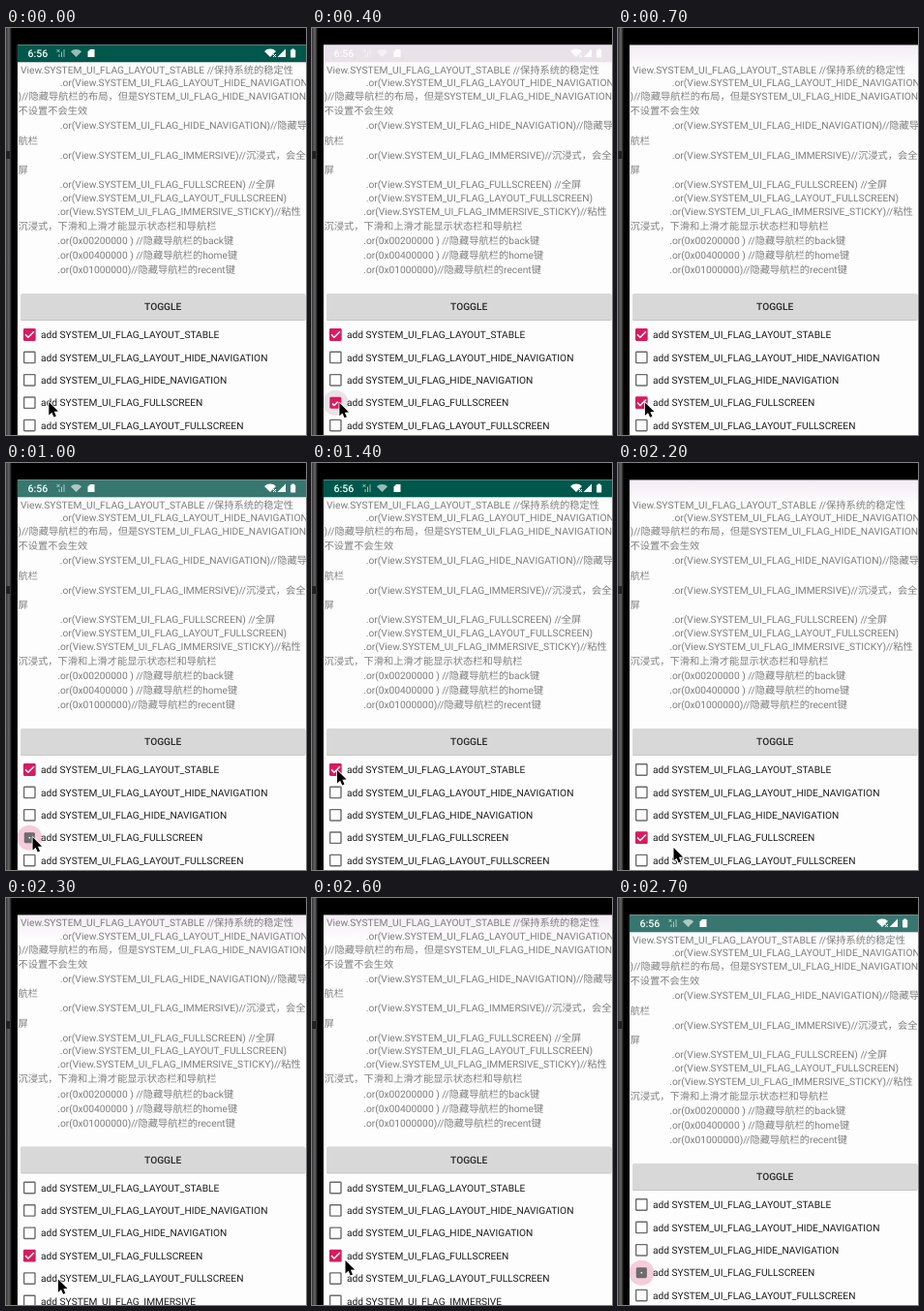
Animation, 310 px wide and 420 px high, one loop 2800 ms. Source, as an HTML page with a canvas:

```html
<!DOCTYPE html>
<html lang="zh-CN">
<head>
<meta charset="utf-8">
<title>System UI flags</title>
<style>
  html, body { margin: 0; width: 100%; height: 100%; overflow: hidden; background: #000; }
  canvas { display: block; width: 310px; height: 420px; }
</style>
</head>
<body>
<canvas id="stage"></canvas>
<script>
const W = 310, H = 420, LOOP = 2800, STEP = 100;
const LEFT = 12, TOP = 17.3, BAR_H = 18, BOX_X = 24.3;
const PAPER = '#fdfdfd', PINK = '#d81b60', GREY = '#6c6c6c';
const FAMILY = 'Roboto, "Noto Sans CJK SC", "Noto Sans CJK", sans-serif';

const canvas = document.getElementById('stage');
const ctx = canvas.getContext('2d');
const dpr = window.devicePixelRatio || 1;
canvas.width = W * dpr;
canvas.height = H * dpr;

const FLAG = 'SYSTEM_UI_FLAG_';
const indent = (str, n = 17) => ' '.repeat(n) + str;
const or = (name, n) => indent(`.or(View.${FLAG}${name}`, n);

const LINES = [
  ` View.${FLAG}LAYOUT_STABLE //保持系统的稳定性`,
  or('LAYOUT_HIDE_NAVIGATION'),
  `)//隐藏导航栏的布局，但是${FLAG}HIDE_NAVIGATION`,
  '不设置不会生效',
  or('HIDE_NAVIGATION)//隐藏导'),
  '航栏',
  or('IMMERSIVE)//沉浸式，会全'),
  '屏',
  or('FULLSCREEN) //全屏'),
  or('LAYOUT_FULLSCREEN)'),
  or('IMMERSIVE_STICKY)//粘性', 16),
  '沉浸式，下滑和上滑才能显示状态栏和导航栏',
  indent('.or(0x00200000 ) //隐藏导航栏的back键', 16),
  indent('.or(0x00400000 ) //隐藏导航栏的home键', 16),
  indent('.or(0x01000000)//隐藏导航栏的recent键', 16)
];
const OPTIONS = ['LAYOUT_STABLE', 'LAYOUT_HIDE_NAVIGATION', 'HIDE_NAVIGATION',
  'FULLSCREEN', 'LAYOUT_FULLSCREEN', 'IMMERSIVE'];
const STABLE = 0, FULL = 3;
const START = { [STABLE]: true };
const TAPS = { [STABLE]: [1500], [FULL]: [300, 1000, 1900, 2700] };

// Places the pointer passes: [time, x, y]
const STOPS = [[0, 44.3, 386], [200, 28.5, 387], [1100, 27.5, 386], [1400, 26, 317],
  [1500, 26, 317], [1800, 28.3, 388], [2100, 28.5, 388], [2200, 57.5, 397], [2600, 34.5, 374]];

const rowY = i => 316.5 + i * 23.4;
const clamp = v => Math.max(0, Math.min(1, v));
const mix = (a, b, k) => a + (b - a) * k;

// Whether an option is on, and how many steps ago it was tapped
function option(row, t) {
  const done = (TAPS[row] || []).filter(time => time <= t);
  const on = !!START[row] !== (done.length % 2 === 1);
  return { on, age: done.length ? (t - done[done.length - 1]) / STEP : Infinity };
}

function pointerAt(t) {
  const i = STOPS.findIndex(s => s[0] > t);
  if (i < 0) return STOPS[STOPS.length - 1].slice(1);
  const [a, b] = [STOPS[i - 1], STOPS[i]];
  const u = (t - a[0]) / (b[0] - a[0]);
  const k = u * u * (3 - 2 * u);
  return [mix(a[1], b[1], k), mix(a[2], b[2], k)];
}

function text(str, x, y, color, size = 10.2, weight = 400) {
  ctx.font = `${weight} ${size}px ${FAMILY}`;
  ctx.fillStyle = color;
  ctx.fillText(str, x, y + size * .355);
}

function rect(x, y, w, h, color, r = 0) {
  ctx.fillStyle = color;
  ctx.beginPath();
  ctx.roundRect(x, y, w, h, r);
  ctx.fill();
}

const square = (x, y, half, color, r) =>
  rect(x - half, y - half, half * 2, half * 2, color, r);

function path(points, close) {
  ctx.beginPath();
  points.forEach(([x, y]) => ctx.lineTo(x, y));
  if (close) ctx.closePath();
}

function line(...points) {
  path(points);
  ctx.stroke();
}

function shape(...points) {
  path(points, true);
  ctx.fill();
}

function fade(x0, y0, x1, y1, ...colors) {
  const g = ctx.createLinearGradient(x0, y0, x1, y1);
  colors.forEach((c, i) => g.addColorStop(i / (colors.length - 1), c));
  return g;
}

function drawPhone() {
  rect(0, 0, W, H, '#000');
  rect(0, 0, 6, H, fade(0, 0, 6, 0, '#333', '#666', '#000'));
  rect(10.5, TOP, 1.5, H, '#1c1c1c');
  rect(0, 127, 4, 8, '#222');
}

// p runs from empty (0) over a filled grey box (.5) to ticked (1)
function drawBox(y, p) {
  const x = BOX_X;
  const half = 5.4 + Math.min(1, Math.abs(p - .5) * 2);
  square(x, y, half, p < .5 ? GREY : PINK, 1.4);
  if (p < .5) {
    square(x, y, 5 * (1 - p * 2), PAPER, .4);
    return;
  }
  const grow = p * 2 - 1, midX = x - 1.4, midY = y + 2.8;
  ctx.strokeStyle = '#fff';
  ctx.lineWidth = 1.5;
  line([midX - 3 * grow, midY - 3 * grow], [midX, midY], [midX + 6 * grow, midY - 6 * grow]);
}

function drawOption(row, t) {
  const { on, age } = option(row, t), y = rowY(row);
  ctx.globalAlpha = .22 * clamp(1 - age / 3) * (on || age < 1);
  ctx.fillStyle = on ? '#7a4a64' : PINK;
  ctx.beginPath();
  ctx.arc(BOX_X, y, 13, 0, Math.PI * 2);
  ctx.fill();
  ctx.globalAlpha = 1;
  drawBox(y, clamp(.42 + (on ? .4 : -.42) * age));
  text(`add ${FLAG}${OPTIONS[row]}`, 36, y, '#1c1c1c');
}

// Lines with Chinese glyphs are taller than Latin ones
function drawLines() {
  let y = 31.8;
  for (const str of LINES) {
    const tall = /[^\x00-\x7f]/.test(str);
    y += tall ? 11.2 : 9.4;
    text(str, 12.5, y, '#7e7e7e', 10.25);
    y += tall ? 4 : 2.8;
  }
}

function drawContent(t) {
  drawLines();
  rect(15, 275, 294.5, 27, '#c6c6c6', 1.5);
  rect(15, 274, 294.5, 27, '#d8d8d8', 1.5);
  ctx.textAlign = 'center';
  text('TOGGLE', 162.2, 287.5, '#2a2a2a', 10.2, 500);
  ctx.textAlign = 'left';
  OPTIONS.forEach((_, row) => drawOption(row, t));
}

function fan(x, y, r) {
  ctx.beginPath();
  ctx.moveTo(x, y);
  ctx.arc(x, y, r, -Math.PI * .75, -Math.PI * .25);
  ctx.fill();
}

function cross(x, y, s = 3) {
  line([x, y], [x + s, y + s]);
  line([x + s, y], [x, y + s]);
}

function drawIcons() {
  const base = 30;
  text('6:56', 22.5, 26, '#fff', 10.6, 500);

  ctx.fillStyle = ctx.strokeStyle = 'rgba(255,255,255,.6)';
  ctx.lineWidth = 1;
  for (let i = 0; i < 3; i++) line([55 + i * 2.5, base], [55 + i * 2.5, base - 3 - i * 2.5]);
  cross(52.5, 22);
  fan(72.5, base, 8);

  ctx.fillStyle = ctx.strokeStyle = '#fff';
  shape([84.5, 24.5], [87, 22], [91.5, 22], [91.5, base], [84.5, base]);
  fan(273, base, 8.5);
  cross(276, 27);
  shape([280.5, base], [289, base], [289, base - 8.5]);
  rect(294, 22.5, 5.2, 8, '#fff', .7);
  rect(295.4, 21.5, 2.4, 1.5, '#fff');
}

function drawStatus({ on, age }) {
  const bar = clamp(on ? .7 * (1 - age) : .76 + .24 * age);
  const ghost = on ? clamp(1.45 - .55 * age) : 1;
  ctx.globalAlpha = ghost;
  rect(LEFT, TOP, W, BAR_H, '#e8e0e8');
  ctx.globalAlpha = bar;
  rect(LEFT, TOP, W, BAR_H, '#00574b');
  ctx.globalAlpha = ghost;
  drawIcons();
  ctx.globalAlpha = 1;
}

function drawPointer(x, y) {
  ctx.save();
  ctx.translate(x, y);
  path([[0, 0], [0, 13.5], [3.1, 10.7], [5.2, 15.4], [7.5, 14.4], [5.4, 9.8], [9.6, 9.6]], true);
  ctx.lineJoin = 'round';
  ctx.lineWidth = 1.6;
  ctx.strokeStyle = '#fff';
  ctx.stroke();
  ctx.fillStyle = '#000';
  ctx.fill();
  ctx.restore();
}

function draw(t) {
  const full = option(FULL, t);
  const lifted = full.on && full.age >= 4 && !option(STABLE, t).on;
  ctx.setTransform(dpr, 0, 0, dpr, 0, 0);
  ctx.textRendering = 'geometricPrecision';
  drawPhone();

  ctx.save();
  ctx.beginPath();
  ctx.rect(LEFT, TOP, W - LEFT, H - TOP);
  ctx.clip();
  rect(LEFT, TOP, W, H, fade(0, TOP, 0, TOP + 24, '#f4ebf5', PAPER));
  ctx.save();
  if (lifted) ctx.translate(0, -17.5);
  drawContent(t);
  ctx.restore();
  drawStatus(full);
  ctx.restore();

  if (t < 2700) drawPointer(...pointerAt(t));
}

function tick() {
  const now = (performance.now() + 4) % LOOP;
  draw(Math.floor(now / STEP) * STEP);
  requestAnimationFrame(tick);
}
tick();
</script>
</body>
</html>
```
